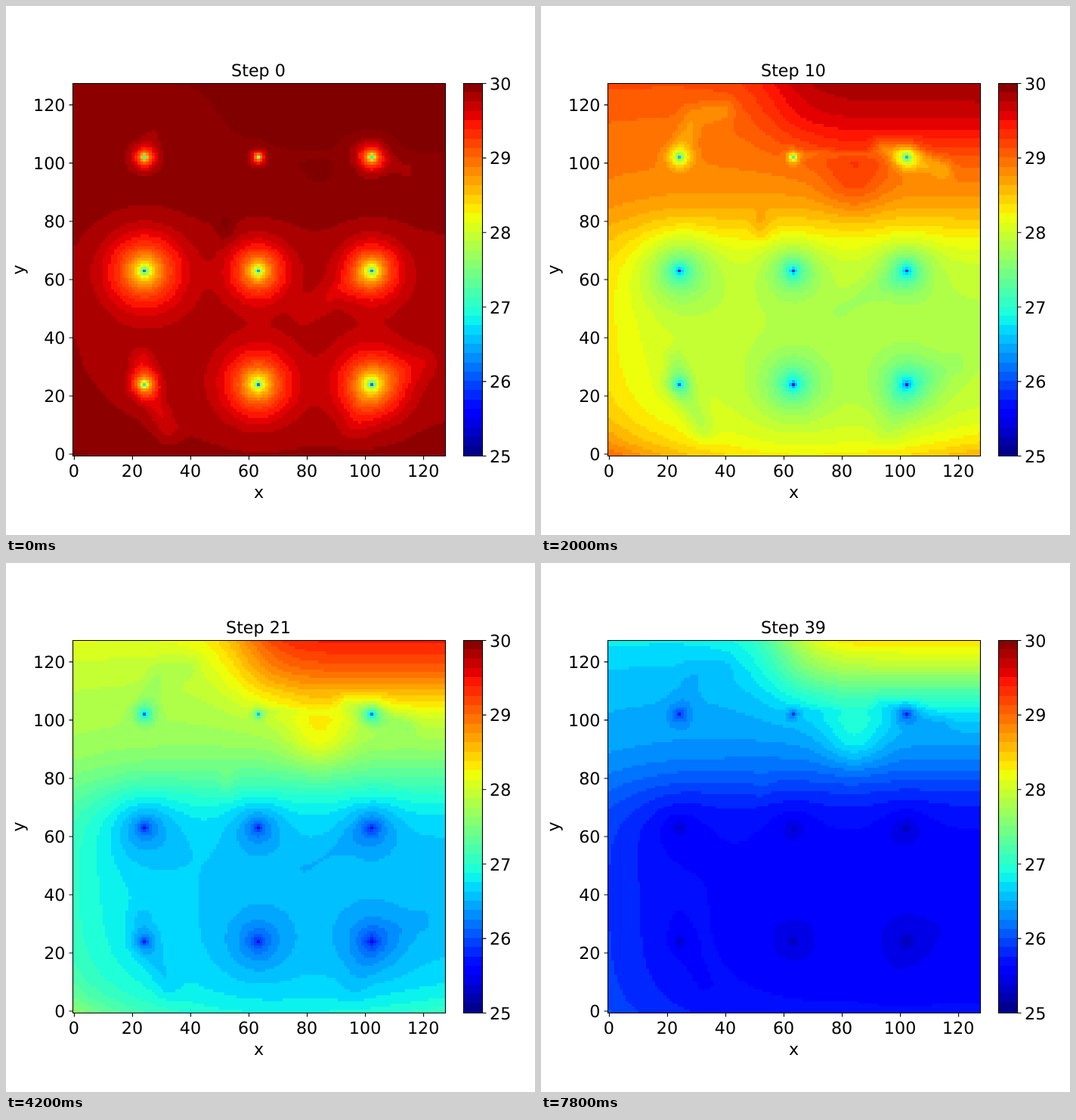
These frames come from a looping animation (700x700 px, 8000 ms). An HTML page with a canvas:

```html
<!DOCTYPE html>
<html lang="en">
<head>
<meta charset="utf-8">
<title>Field steps</title>
<style>
html, body { margin: 0; width: 100%; height: 100%; overflow: hidden; background: #fff; }
#stage { position: relative; width: 700px; height: 700px; overflow: hidden; }
canvas { position: absolute; image-rendering: pixelated; }
#field { left: 88.5px; top: 102px; width: 493px; height: 493px; }
#bar { left: 605px; top: 102px; width: 25px; height: 493px; }
svg { position: absolute; left: 0; top: 0; }
text { font: 22.22px "DejaVu Sans", sans-serif; fill: #000; text-rendering: geometricPrecision; }
path { fill: none; stroke: #000; stroke-width: 1.1; }
</style>
</head>
<body>
<div id="stage">
  <canvas id="field" width="128" height="128"></canvas>
  <canvas id="bar" width="1" height="493"></canvas>
  <svg id="axes" width="700" height="700"></svg>
</div>
<script>
const N = 128, STEP_MS = 200, STEPS = 40;
const LOW = 25, SPAN = 5;

const { exp, hypot, floor, max, min, round } = Math;
const clamp = (v, a, b) => min(b, max(a, v));
const sigmoid = v => 1 / (1 + exp(-v));
const bump = d => exp(-d * d);

// Sinks stand on a 3 x 3 grid, each with its own reach.
const radii = [7, 18, 18, 20, 15, 15, 6, 3.6, 7];
const wells = radii.map((R, i) => ({ x: 24 + 39 * (i % 3), y: 24 + 39 * floor(i / 3), R }));
const STEEP = .155;

// Streaks that drain faster (or slower, if drop is negative)
const streaks = [
  { drop: .06, width: 4, path: [[24, 103], [29, 116], [39, 118]] },
  { drop: -.05, width: 3, path: [[52, 76], [52, 80]] },
  { drop: .04, width: 1.5, path: [[66, 103], [89, 103]] },
  { drop: .09, width: 3.5, path: [[94, 105], [102, 102], [114, 98]] },
  { drop: .05, width: 4, path: [[102, 63], [79, 49]] },
  { drop: .09, width: 4, path: [[23, 32], [24, 24], [32, 9]] },
  { drop: .05, width: 5, path: [[119, 31], [102, 24], [96, 8]] }
];

function segmentDistance(x, y, [x1, y1], [x2, y2]) {
  const dx = x2 - x1, dy = y2 - y1;
  const f = clamp(((x - x1) * dx + (y - y1) * dy) / (dx * dx + dy * dy), 0, 1);
  return hypot(x - x1 - f * dx, y - y1 - f * dy);
}

const pathDistance = (x, y, path) =>
  min(...path.slice(1).map((p, i) => segmentDistance(x, y, path[i], p)));

// Total decay at the last step: strong in the south, weak in the north-east.
function totalDecay(x, y) {
  const north = sigmoid((y - 76) / 7);
  const corner = sigmoid((x - 58) / 7) * sigmoid((y - 108) / 6);
  return 2.2 - .95 * north - .68 * corner - .2 * (y / 127) ** 8
    - .45 * exp(-x / 26) * (1 - .95 * north)
    - .15 * exp(-y / 10)
    - .25 * bump(hypot(x - 84, y - 93) / 11);
}

// Slowly drained places also start later.
function delay(x, y, q) {
  return 1 + 1.8 * exp(-1.7 * q) + .13 * exp(-y / 10) * (1 + 1.8 * ((x - 64) / 64) ** 2);
}

function makeCell(x, y) {
  const q = totalDecay(x, y);
  let level = 1, drop = 0;
  for (const w of wells) {
    const r = max(.15, hypot(x - w.x, y - w.y));
    level *= 1 - STEEP * Math.log(1 + (w.R / r) ** 6) / 6;
  }
  for (const s of streaks) drop += s.drop * bump(pathDistance(x, y, s.path) / s.width);
  return { q, power: delay(x, y, q), level, drop };
}

const cells = Array.from({ length: N * N }, (_, i) => makeCell(i % N, N - 1 - floor(i / N)));

function cellValue(c, time) {
  const q = c.q * time ** c.power;
  const reached = 1 - exp(-30 * q);
  return LOW + SPAN * c.level * (1 - c.drop * reached) * exp(-q);
}

function ramp(points, v) {
  const i = max(1, points.findIndex(p => v <= p[0]));
  const [x0, y0] = points[i - 1], [x1, y1] = points[i];
  return y0 + (y1 - y0) * (v - x0) / (x1 - x0);
}
const channels = [
  [[0, 0], [.35, 0], [.66, 1], [.89, 1], [1, .5]],
  [[0, 0], [.125, 0], [.375, 1], [.64, 1], [.91, 0], [1, 0]],
  [[0, .5], [.11, 1], [.34, 1], [.65, 0], [1, 0]]
];

// Colour bands, plus one thin band at the very top
const BAND = .125, TOP = 29.94;
const rgb = t => channels.map(p => round(255 * ramp(p, clamp((t - LOW) / SPAN, 0, 1))));
const palette = Array.from({ length: 41 }, (_, k) => rgb(TOP - k * BAND));
const topColor = rgb(30);
const color = t => t > 29.97 ? topColor : palette[clamp(round((TOP - t) / BAND), 0, 40)];

function paint(id, w, h, valueAt) {
  const ctx = document.getElementById(id).getContext("2d");
  const image = ctx.createImageData(w, h);
  for (let i = 0; i < w * h; i++) {
    image.data.set(color(valueAt(i)), i * 4);
    image.data[i * 4 + 3] = 255;
  }
  ctx.putImageData(image, 0, 0);
}

// Axes
const axes = document.getElementById("axes");
function add(tag, attrs, content = "") {
  const el = document.createElementNS("http://www.w3.org/2000/svg", tag);
  for (const k in attrs) el.setAttribute(k, attrs[k]);
  el.textContent = content;
  axes.appendChild(el);
  return el;
}
const label = (x, y, s, anchor = "middle", extra = {}) =>
  add("text", { x, y, "text-anchor": anchor, ...extra }, s);

let lines = "M88.5 102.5H581.5V595.5H88.5ZM605.5 102.5H630.5V595.5H605.5Z";
for (let v = 0; v <= 120; v += 20) {
  const d = (v + .5) * 493 / N, x = 88.5 + d, y = 595 - d;
  lines += `M${x} 595.5v5M88.5 ${y}h-5`;
  label(x - .5, 623, v);
  label(78.5, y + 8.3, v, "end");
}
for (let v = 25; v <= 30; v++) {
  const y = 595.5 - (v - 25) * 98.6;
  lines += `M630.5 ${y}h5`;
  label(640, y + 8.3, v, "start");
}
add("path", { d: lines });
label(334.5, 651, "x");
label(0, 0, "y", "middle", { transform: "translate(24 349) rotate(-90)" });
const title = label(334, 93, "Step 0");

paint("bar", 1, 493, i => 30 - (i + .5) / 493 * SPAN);

let shown = -1;
const start = performance.now();
function tick(now) {
  const step = floor(max(0, now - start) / STEP_MS) % STEPS;
  if (step !== shown) {
    shown = step;
    const time = (step + .8) / (STEPS - .2);
    paint("field", N, N, i => cellValue(cells[i], time));
    title.textContent = "Step " + step;
  }
  requestAnimationFrame(tick);
}
tick(start);
</script>
</body>
</html>
```
